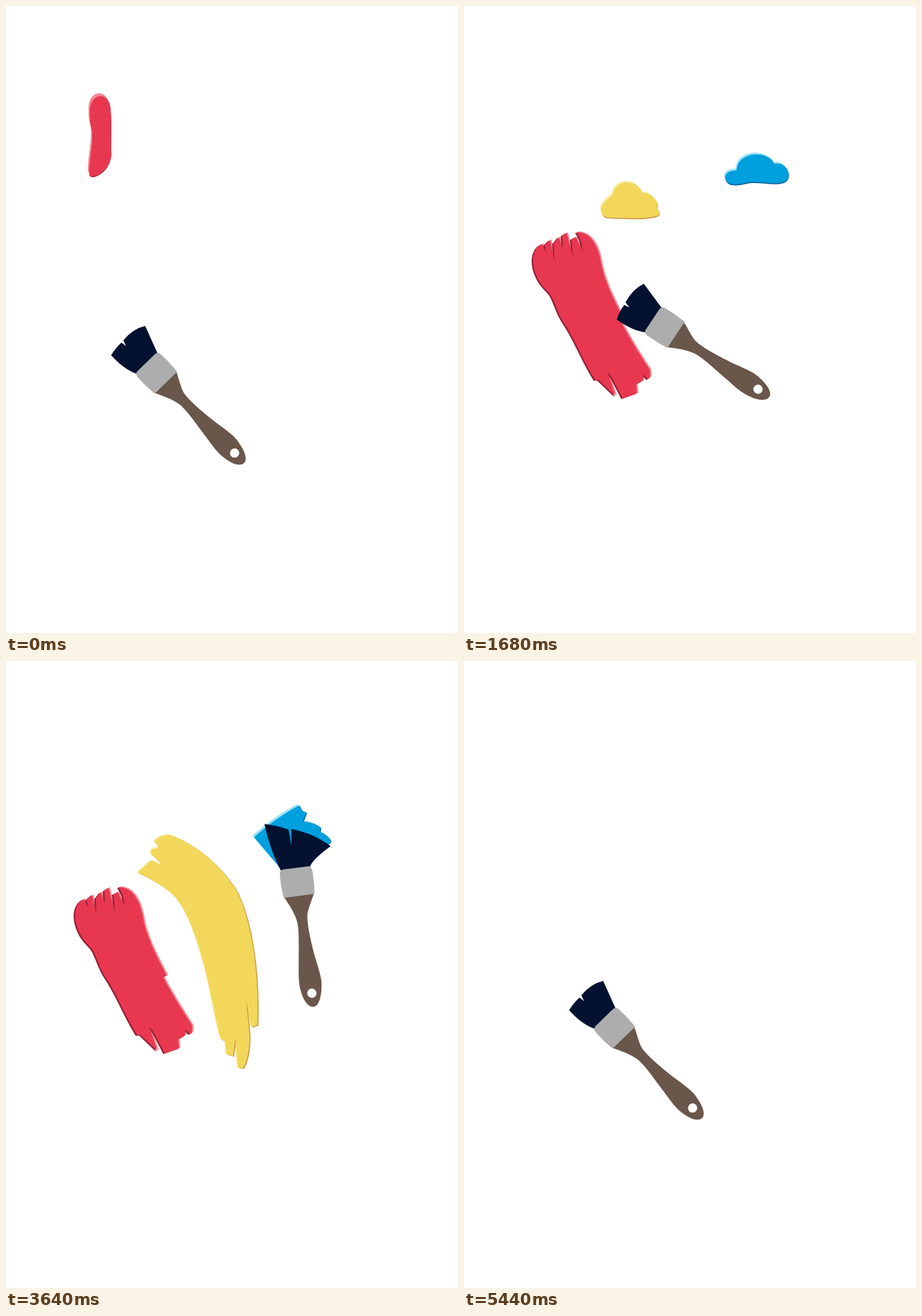
An HTML page that plays this animation: 635 px wide and 882 px high, repeating every 5.8 s.

```html
<!DOCTYPE html>
<html lang="en">
<head>
<meta charset="utf-8">
<title>Paint brush</title>
<style>
  html, body { margin: 0; width: 100%; height: 100%; overflow: hidden; background: #fff; }
  svg { display: block; width: 100%; height: 100%; }
</style>
</head>
<body>
<svg viewBox="0 0 635 882">
  <defs id="defs"></defs>
  <g id="scene">
    <g id="paints"></g>
    <g id="brush">
      <path id="bristles" fill="#041230"/>
      <path fill="#6a564a" fill-rule="evenodd" d="M-21.5 18 L21.5 18 C17 28 12 36 9 44 C5 56 8 84 11 108
        C14 126 17 142 14.5 151 C12 168 6 177 0 177 C-7 177 -13 168 -15 153 C-17 142 -15 128 -13 115
        C-10 90 -6 70 -7.500 55 C-10 40 -17 28 -21.500 18Z M-6.500 157.700 a6.500 6.500 0 1 0 13 0 a6.500 6.500 0 1 0 -13 0Z"/>
      <path fill="#adadad" d="M-17 -20 H17 Q22 -20 23 -14 Q24 2 22 19.500 H-22 Q-24 2 -23 -14 Q-22 -20 -17 -20Z"/>
    </g>
  </g>
</svg>
<script>
const LOOP = 5800, STEP = 40, END = 5440;
const $ = id => document.getElementById(id);

function add(parent, tag, attrs = {}) {
  const node = document.createElementNS('http://www.w3.org/2000/svg', tag);
  for (const key in attrs) node.setAttribute(key, attrs[key]);
  return parent.appendChild(node);
}

const DROP = 'M118 147 C118 121 147 119 147 147 C149 165 147 190 148 208 C147 225 135 238 122 240 Q116 240 117 232 C118 210 123 190 121 175 Q117 160 118 147Z';

// light / dark: offsets of the lit and shaded edges
const paints = [
  {
    name: 'red', color: '#e8384f', lightColor: '#f58a97', darkColor: '#8f2038',
    light: [2, -1], dark: [-2, 1], dropX: 0, dropY: 0, start: 0, land: 120, swipe: 1080, floor: 383,
    blob: 'M98 360 C95 340 115 345 120 330 C135 312 165 315 170 333 Q192 340 190 360 Q188 385 150 380 Q102 388 98 360Z',
    stroke: `M103 382 C93 362 96 341 109 335 L116 347 L113 336 L121 329 L127 358 L126 334 L133 325 L139 341 L138 323
      L144 319 L153 353 L151 328 L157 325 L167 345 L164 329 L158 318 C180 318 189 341 192 358 C196 385 210 413 226 443
      L220 443 L224 451 C238 476 250 495 261 512 Q263 524 258 525 L252 518 Q254 530 242 531 L243 545 L223 552 L209 525
      L201 513 L213 549 L189 526 L184 526 C165 495 157 470 138 442 C128 424 126 410 118 402 Q107 391 103 382Z`,
    trail: 'M135 300 L240 560', width: 170,
    progress: [[1080, .2], [1120, .27], [1200, .66], [1320, 1]]
  },
  {
    name: 'yellow', color: '#f2d75a', lightColor: '#f8e88f', darkColor: '#cd9944',
    light: [-1.5, -1], dark: [1.5, 1], dropX: 101, dropY: -84, start: 160, land: 280, swipe: 2280, floor: 298,
    blob: 'M193 287 C193 278 205 270 209 266 C213 243 245 244 251 264 C262 262 272 274 272 279 L271 284 Q277 291 273 294 C262 301 215 298 201 297 Q193 296 193 287Z',
    stroke: `M185 298 L204 281 Q209 280 217 288 L216 283 L204 272 Q203 264 210 264 L215 262 L209 254 Q216 244 231 245
      C260 254 300 285 322 320 C345 360 356 440 353 512 L345 515 L337 475 L341 514 Q345 550 333 573 L326 572 L322 530
      L319 556 L310 553 L308 534 L302 532 C293 500 287 455 275 415 C262 370 250 345 236 330 C220 315 205 307 185 298Z`,
    trail: 'M170 262 Q330 290 332 600', width: 170,
    progress: [[2240, .1], [2320, .4], [2400, .66], [2560, 1]]
  },
  {
    name: 'blue', color: '#009fdd', lightColor: '#9ce2f6', darkColor: '#005c94',
    light: [-2.5, -2], dark: [1, 1], dropX: 279, dropY: -84, start: 360, land: 480, swipe: 3520, floor: 251,
    blob: 'M367 243 C366 232 378 232 383 231 C385 203 428 203 436 222 C446 219 457 228 456 238 Q455 248 443 249 C425 250 408 245 395 249 Q370 255 367 243Z',
    stroke: `M412 203 L416 211 L422 213 L417 226 Q430 226 442 234 L441 240 Q456 247 456 254 C450 268 425 277 410 283
      C425 281 443 276 454 286 Q459 280 463 290 C463 320 452 322 441 333 Q432 342 439 343 C460 343 485 325 508 328
      L512 342 L514 331 C525 352 528 385 517 403 C500 428 465 455 442 480 L432 477 L423 466 L425 475 L400 458 L412 441
      C430 415 445 402 441 386 C435 378 415 397 392 397 C370 397 352 372 360 360 C372 340 390 335 385 324
      C375 313 345 318 328 315 C318 308 317 285 329 268 C345 248 380 220 412 203Z`,
    trail: 'M445 200 L345 285 L440 295 L375 370 L490 360 L405 490', width: 100,
    progress: [[3520, .06], [3600, .14], [3720, .24], [3920, .37], [4200, .48], [4280, .53], [4520, .72], [4680, .8], [4880, 1]]
  }
];

// time, ferrule x, y, angle, left bristle tip x, y, right bristle tip x, y
const REST = [-28, -62, 35, -58];
const PRESS = [-35, -87, 53, -44];
const brushKeys = [
  [0, 211, 516, -44.3, ...REST],
  [480, 211, 516, -44.3, ...REST],
  [600, 203, 480, -44.3, ...REST],
  [920, 140, 195, -45, ...REST],
  [1120, 190, 426, -46, ...PRESS],
  [1200, 242, 505, -60, ...PRESS],
  [1340, 325, 560, -68, ...REST],
  [1800, 258, 400, -52, ...REST],
  [2080, 184, 283, -46, ...REST],
  [2240, 263, 304, -51.2, -49, -62, 36, -71],
  [2320, 312, 362, -35, -45, -64, 38, -68],
  [2400, 330, 432, -5, -38, -64, 38, -62],
  [2640, 322, 642, 9, ...REST],
  [3000, 290, 419, 22, ...REST],
  [3040, 299, 366, 22.8, -30, -62, 34, -59],
  [3440, 435, 180, 10, ...REST],
  [3600, 424, 288, -5, ...PRESS],
  [3720, 375, 342, -12, ...PRESS],
  [3920, 458, 350, -28, -40, -70, 36, -68],
  [4200, 424, 370, -46, -30, -79, 46, -58],
  [4280, 433, 390, -69.3, -20, -79, 52, -49],
  [4520, 520, 425, -25, -40, -70, 36, -68],
  [4800, 450, 425, 5, ...PRESS],
  [4960, 363, 534, 20.7, -31, -62, 34, -60],
  [5080, 358, 540, 20.7, ...REST]
];

// Smooth interpolation that never overshoots a key
function sample(keys, t) {
  const last = keys.length - 1;
  if (t <= keys[0][0]) return keys[0].slice(1);
  if (t >= keys[last][0]) return keys[last].slice(1);
  const i = keys.findIndex(key => key[0] > t) - 1;
  const span = keys[i + 1][0] - keys[i][0], u = (t - keys[i][0]) / span;
  const slope = (n, c) => (keys[n + 1][c] - keys[n][c]) / (keys[n + 1][0] - keys[n][0]);
  const tangent = (n, c) => {
    if (n === 0 || n === last) return 0;
    const a = slope(n - 1, c), b = slope(n, c);
    return a * b <= 0 ? 0 : 2 * a * b / (a + b);
  };
  return keys[i].slice(1).map((_, k) => {
    const c = k + 1, p = keys[i][c], q = keys[i + 1][c];
    const ease = u * u * (3 - 2 * u);
    return p + (q - p) * ease
      + span * (tangent(i, c) * u * (1 - u) ** 2 - tangent(i + 1, c) * u * u * (1 - u));
  });
}

function addShape(parent, paint, d, offsets = paint) {
  const group = add(parent, 'g');
  const layers = [[paint.lightColor, offsets.light], [paint.darkColor, offsets.dark], [paint.color, [0, 0]]];
  for (const [fill, offset] of layers) add(group, 'path', { d, fill, transform: `translate(${offset})` });
  return group;
}

for (const paint of paints) {
  const mask = add($('defs'), 'mask', { id: paint.name, maskUnits: 'userSpaceOnUse', x: 0, y: 0, width: 635, height: 882 });
  paint.reveal = add(mask, 'path', {
    d: paint.trail, fill: 'none', stroke: '#fff', 'stroke-width': paint.width, 'stroke-linejoin': 'round', pathLength: 1
  });
  const group = add($('paints'), 'g');
  const edge = { light: [-2, -4], dark: [0, 1] };
  paint.drop = addShape(group, paint, DROP, edge);
  paint.puddle = addShape(group, paint, paint.blob, { light: [-1.5, -2.5], dark: [.5, 1.5] });
  paint.swath = addShape(group, paint, paint.stroke);
}

const show = (node, visible) => node.setAttribute('display', visible ? 'inline' : 'none');

function drawPaint(paint, t) {
  const { start, land, swipe, floor } = paint;
  show(paint.drop, t >= start && t < land);
  show(paint.puddle, t >= land && t < swipe);
  show(paint.swath, t >= swipe);
  paint.drop.setAttribute('transform', `translate(${paint.dropX} ${paint.dropY + (t - start) * 1.5})`);
  const rise = Math.min(1, .6 + (t - land) / 300);
  paint.puddle.setAttribute('transform', `translate(0 ${floor * (1 - rise)}) scale(1 ${rise})`);
  const [done] = sample(paint.progress, t);
  paint.reveal.setAttribute('stroke-dasharray', `${done} 2`);
  if (done < 1) paint.swath.setAttribute('mask', `url(#${paint.name})`);
  else paint.swath.removeAttribute('mask');
}

function drawBrush(t) {
  const [x, y, angle, lx, ly, rx, ry] = sample(brushKeys, t);
  const notchX = lx * .62 + rx * .38 + 1, notchY = ly * .62 + ry * .38 - 4;
  const depth = 8 + (rx - lx - 63) * .6;
  $('brush').setAttribute('transform', `translate(${x} ${y}) rotate(${angle})`);
  $('bristles').setAttribute('d', `M-20 -17 Q${lx * .4 - 18} ${ly * .55} ${lx} ${ly}
    Q${(lx + notchX) / 2} ${(ly + notchY) / 2 - 2} ${notchX - 2} ${notchY}
    L${notchX - 1} ${notchY + depth} L${notchX + 2} ${notchY - .5}
    Q${notchX * .4 + rx * .6} ${(notchY + ry) / 2 - 6} ${rx} ${ry}
    Q${37 - rx * .3} ${ry * .6} 20 -17Z`);
}

function draw(now) {
  const t = Math.floor(now % LOOP / STEP) * STEP;
  const finished = t >= END;
  const slide = finished || t < 4760 ? 0 : 77 * ((t - 4760) / 200) ** 2.2;
  $('scene').setAttribute('transform', `translate(${-slide} 0)`);
  show($('paints'), !finished);
  for (const paint of paints) drawPaint(paint, t);
  drawBrush(finished ? 0 : t);
}

const begin = performance.now();
function tick() {
  draw(performance.now() - begin);
  requestAnimationFrame(tick);
}
tick();
</script>
</body>
</html>
```
